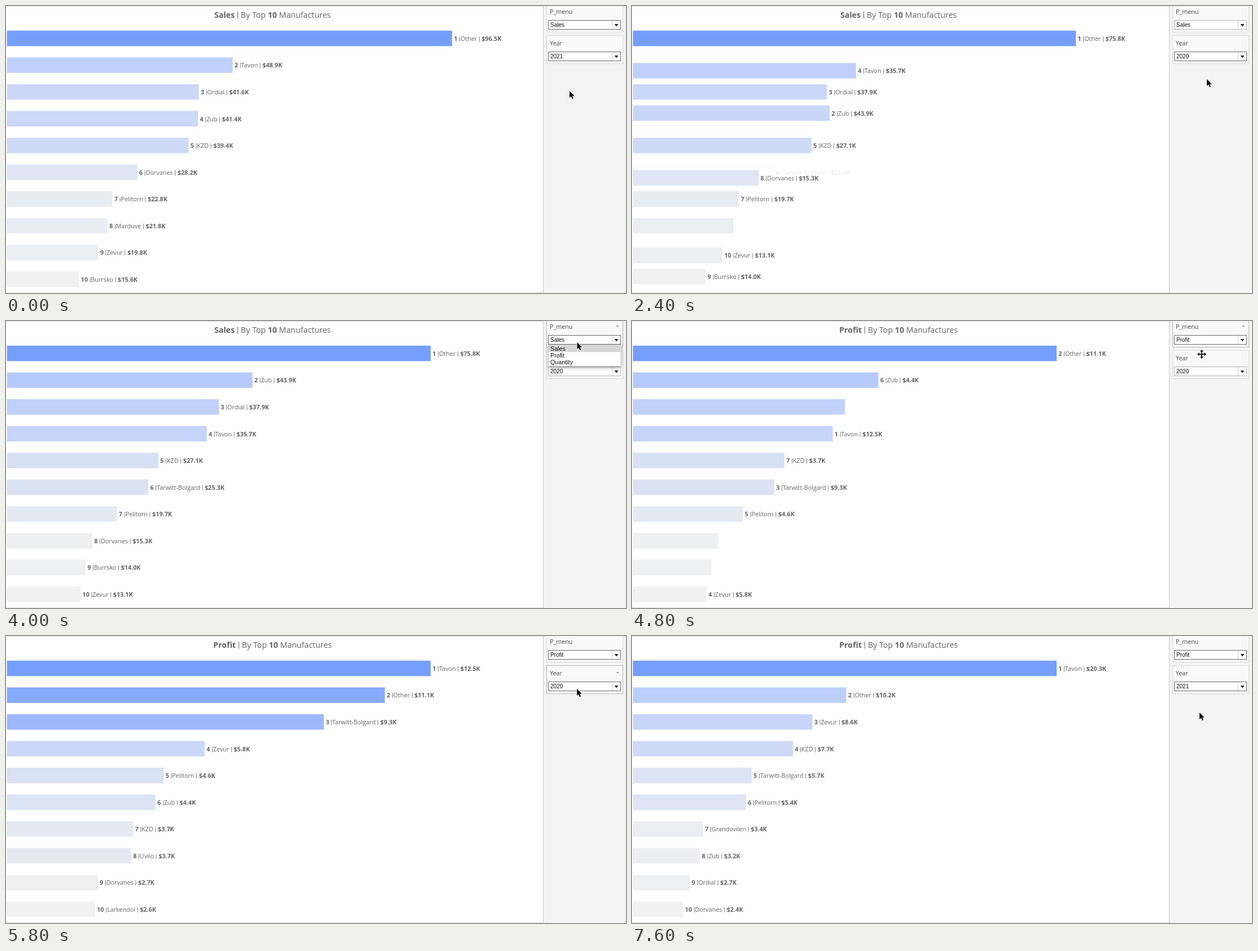
These frames come from a looping animation (1098x510 px, 8 s). An HTML page with a canvas:

```html
<!DOCTYPE html>
<html lang="en">
<head>
<meta charset="utf-8">
<title>Top 10 Manufactures</title>
<style>
  html, body { margin: 0; width: 100%; height: 100%; overflow: hidden; background: #fff; }
  canvas { display: block; width: 1098px; height: 510px; }
</style>
</head>
<body>
<canvas id="stage" width="1098" height="510"></canvas>
<script>
const ctx = document.getElementById('stage').getContext('2d');
const LOOP = 8000, STEP = 100;
const SANS = '"Open Sans", "Noto Sans", sans-serif';
const ARIAL = '"Liberation Sans", Arial, sans-serif';

// Ranked values in thousands; "full" is the pixel length of the longest bar.
function chart(measure, year, full, rows) {
  const list = rows.split(' ').map((row, i) => {
    const [name, value] = row.split(':');
    return { name, value: +value, rank: i + 1 };
  });
  const max = list[0].value, min = list[9].value;
  for (const r of list) {
    r.length = r.value / max * full;
    r.color = shade((r.value - min) / (max - min));
  }
  return { measure, year, list };
}

const RAMP = [
  [0, [241, 241, 241]], [0.09, [231, 235, 242]], [0.29, [207, 218, 246]],
  [0.41, [191, 208, 251]], [1, [117, 158, 255]]
];
const mix = (a, b, k) => a + (b - a) * k;
const mixColor = (a, b, k) => a.map((v, i) => mix(v, b[i], k));

function shade(v) {
  let i = 1;
  while (i < RAMP.length - 1 && v > RAMP[i][0]) i++;
  const [p, a] = RAMP[i - 1], [q, b] = RAMP[i];
  return mixColor(a, b, (v - p) / (q - p));
}

const charts = [
  chart('Sales', '2021', 788, 'Other:96.5 Tavon:48.92 Ordial:41.57 Zub:41.39 KZD:39.36 Dorvanes:28.23 Pelitorn:22.84 Marduve:21.76 Zevur:19.76 Burrsko:15.58'),
  chart('Sales', '2020', 750, 'Other:75.8 Zub:43.91 Ordial:37.9 Tavon:35.72 KZD:27.08 Tarwitt-Bolgard:25.27 Pelitorn:19.66 Dorvanes:15.26 Burrsko:14.04 Zevur:13.14'),
  chart('Profit', '2020', 750, 'Tavon:12.5 Other:11.148 Tarwitt-Bolgard:9.349 Zevur:5.83 Pelitorn:4.62 Zub:4.38 KZD:3.72 Uvilo:3.665 Dorvanes:2.68 Larkendol:2.597'),
  chart('Profit', '2021', 750, 'Tavon:20.3 Other:10.217 Zevur:8.593 KZD:7.659 Tarwitt-Bolgard:5.683 Pelitorn:5.413 Grandovilen:3.356 Zub:3.207 Ordial:2.72 Dorvanes:2.395')
];
// Time of each switch and how long its bars take to settle.
const switches = [[2300, 500], [4800, 300], [7300, 300]];

// Pointer path: time, x, y
const path = [
  [0, 998, 151], [300, 998, 151], [500, 1012, 75], [700, 1024, 24], [900, 1030, 88],
  [1100, 1029, 153], [1200, 1029, 154], [1600, 1018, 130], [3100, 1018, 130],
  [3200, 1018, 63], [3400, 1016, 40], [3500, 1016, 40], [3700, 1013, 33], [3900, 1012, 34],
  [4100, 1011, 42], [4200, 1011, 42], [4500, 1009, 59], [5300, 1009, 59],
  [5600, 1010, 84], [5800, 1011, 94], [6000, 1011, 95], [6600, 1005, 135],
  [6700, 1005, 135], [6800, 1005, 136], [LOOP, 1005, 136]
];
const within = (t, ...spans) => spans.some(([a, b]) => t >= a && t < b);

function pointer(t) {
  let i = 1;
  while (path[i][0] < t) i++;
  const [ta, xa, ya] = path[i - 1], [tb, xb, yb] = path[i];
  const k = (t - ta) / (tb - ta);
  return [mix(xa, xb, k), mix(ya, yb, k)];
}

function rect(x, y, w, h, fill) {
  ctx.fillStyle = fill;
  ctx.fillRect(x, y, w, h);
}

function frame(x, y, w, h, fill, line) {
  rect(x, y, w, h, line);
  rect(x + 1, y + 1, w - 2, h - 2, fill);
}

function poly(points, fill) {
  ctx.beginPath();
  points.forEach(([x, y]) => ctx.lineTo(x, y));
  ctx.closePath();
  ctx.fillStyle = fill;
  ctx.fill();
}

function text(str, x, y, font, color) {
  ctx.font = font;
  ctx.fillStyle = color;
  ctx.fillText(str, x, y);
}

// Lays out runs on one line: "*" marks bold, "|" is a narrow divider.
function runs(parts, x, y, size, color, draw = true) {
  const start = x;
  for (const part of parts) {
    const bold = part[0] === '*';
    const str = bold ? part.slice(1) : part;
    ctx.font = str === '|' ? `${size}px Roboto, sans-serif` : `${bold ? 700 : 400} ${size}px ${SANS}`;
    ctx.fillStyle = color;
    if (draw) ctx.fillText(str, x, y);
    x += ctx.measureText(str).width;
  }
  return x - start;
}

function title(measure) {
  const parts = ['*' + measure, ' ', '|', ' ', 'By Top ', '*10', ' Manufactures'];
  const width = runs(parts, 0, 0, 14.2, '#000', false);
  runs(parts, 472 - width / 2, 21, 14.2, '#636363');
}

function bar(row, length, color, label, alpha) {
  const y = 43.8 + 47.57 * (row - 1);
  ctx.globalAlpha = alpha;
  rect(1.6, y, length + 0.4, 27.5, `rgb(${color.map(Math.round)})`);
  if (label) {
    const parts = ['*' + label.rank, ' ', '|', label.name, ' ', '|', ' ', `*$${label.value.toFixed(1)}K`];
    runs(parts, length + 5.3, y + 18.1, 10.8, '#636363');
  }
  ctx.globalAlpha = 1;
}

function bars(from, to, k) {
  const find = (set, name) => set.list.find(r => r.name === name);
  const names = new Set([...from.list, ...to.list].map(r => r.name));
  for (const name of names) {
    const old = find(from, name), next = find(to, name);
    const a = old || next, b = next || old;
    const alpha = old && next ? 1 : next ? k : 1 - k;
    if (alpha <= 0) continue;
    const label = next && (k > 0 || next.rank < 8) ? next : null;
    bar(mix(a.rank, b.rank, k), mix(a.length, b.length, k), mixColor(a.color, b.color, k), label, alpha);
  }
}

function card(name, y, value, hover, line) {
  frame(957, y, 136, 51, '#f9f9f9', hover ? '#b4b4b4' : '#d9d9d9');
  text(name, 963, y + 17.7, `10.7px ${SANS}`, '#444');
  if (hover) poly([[1080, y + 12], [1086, y + 12], [1083, y + 15]], '#a8a8a8');
  frame(960, y + 29, 129, 17, '#fff', line);
  rect(1073, y + 30, 1, 15, '#d0d0d0');
  poly([[1077.5, y + 36], [1084.5, y + 36], [1081, y + 40.5]], '#222');
  text(value, 964, y + 41.2, `10px ${ARIAL}`, '#111');
}

function menu(y, items, value, pointerY) {
  const pitch = 12.4, height = items.length * pitch + 1.4;
  ctx.save();
  ctx.shadowColor = 'rgba(0,0,0,0.35)';
  ctx.shadowBlur = 6;
  ctx.shadowOffsetY = 2;
  rect(960.5, y, 128.5, height, '#c4c4c4');
  ctx.restore();
  rect(961, y + 0.5, 127.5, height - 1, '#fff');
  const top = y + 0.7;
  const over = Math.floor((pointerY - top) / pitch);
  const active = items[over] ? over : items.indexOf(value);
  items.forEach((item, i) => {
    if (i === active) rect(961, top + i * pitch, 127.5, pitch, '#d6d6d6');
    text(item, 964, y + 10.5 + i * pitch, `10.7px ${ARIAL}`, '#111');
  });
}

function arrow(x, y) {
  ctx.save();
  ctx.translate(x, y);
  ctx.lineJoin = 'round';
  ctx.strokeStyle = '#fff';
  ctx.lineWidth = 1.6;
  const shape = [[0, 0], [0, 12], [2.8, 9.5], [4.9, 14.2], [7, 13.2], [5, 8.7], [8.7, 8.5]];
  poly(shape, '#000');
  ctx.stroke();
  ctx.fill();
  ctx.restore();
}

function moveSign(x, y) {
  ctx.save();
  ctx.translate(x, y);
  for (let i = 0; i < 4; i++) {
    rect(-0.8, -6, 1.6, 6.5, '#000');
    poly([[0, -8], [3, -4.4], [-3, -4.4]], '#000');
    ctx.rotate(Math.PI / 2);
  }
  ctx.restore();
}

function draw(t) {
  let index = 0, k = 1;
  switches.forEach(([start, span], i) => {
    if (t < start) return;
    index = i + 1;
    const p = Math.min(1, (t - start) / span);
    k = p * p * (3 - 2 * p);
  });
  const now = charts[index], before = charts[Math.max(0, index - 1)];
  const [x, y] = pointer(t);

  rect(0, 0, 1098, 510, '#fff');
  rect(0, 0, 951, 1, '#dcdcdc');
  rect(0, 509, 951, 1, '#dcdcdc');
  title(now.measure);
  bars(before, now, k);

  rect(951, 0, 147, 510, '#f4f4f4');
  rect(951, 0, 1, 510, '#c6c6c6');
  const menuLine = within(t, [2300, 3400]) ? '#b5b5b5' : '#6a6a6a';
  const yearLine = within(t, [3400, 5400]) ? '#b5b5b5' : '#6a6a6a';
  card('P_menu', -4, now.measure, within(t, [3400, 4900]), menuLine);
  card('Year', 52, now.year, within(t, [600, 2400], [5400, 7400]), yearLine);

  if (within(t, [1000, 2100], [5900, 7100])) menu(98, ['2018', '2019', '2020', '2021'], now.year, y);
  if (within(t, [3900, 4600])) menu(42, ['Sales', 'Profit', 'Quantity'], now.measure, y);

  if (within(t, [3200, 3300], [4600, 5500])) moveSign(x, y);
  else arrow(x, y);
}

function tick() {
  const t = performance.now() % LOOP;
  draw(Math.floor(t / STEP) * STEP);
  requestAnimationFrame(tick);
}
tick();
</script>
</body>
</html>
```
